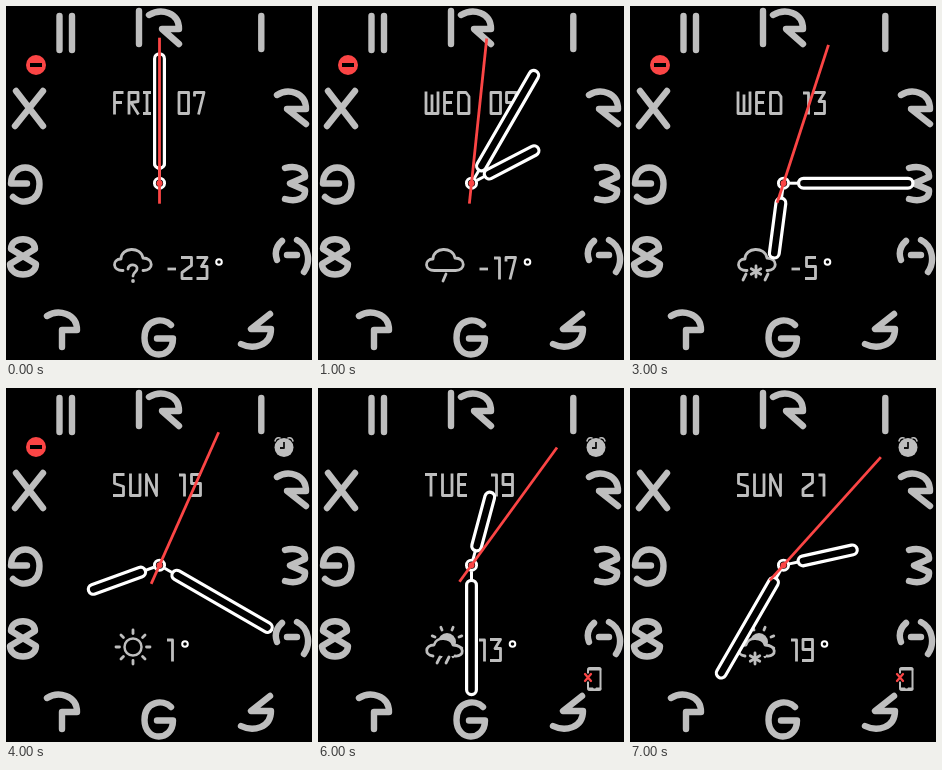
These frames come from a looping animation (306x354 px, 8 s). An HTML page with a canvas:

```html
<!DOCTYPE html>
<html lang="en">
<head>
<meta charset="utf-8">
<title>Watch face</title>
<style>
  html, body { margin: 0; width: 100%; height: 100%; overflow: hidden; background: #000; }
  canvas { display: block; width: 306px; height: 354px; }
</style>
</head>
<body>
<canvas id="face" width="306" height="354"></canvas>
<script>
const ctx = document.getElementById("face").getContext("2d");
const GRAY = "#bebebe", WHITE = "#fff", RED = "#fb4545";
const CENTER = { x: 153.5, y: 177.2 };
const STEPS = 8, STEP_MS = 1000;

// Hour marks, clockwise from 12
const NUMERALS = [
  "M133 5V38M143 9C155 2 173 6 173 23H156L173 38",
  "M255.3 10V43",
  "M271 89C282 82 300 86 300 103H281L300 118",
  "M279 162C290 159 300 163 299 171L284 177.5L299 184C300 193 290 196 279 193",
  "M276 235Q267 243 271 254M281 249H291M291 234C303 240 305 256 298 266",
  "M264 308L245 323H265C265 340 247 344 235 338",
  "M151 332.5H167C167 354 138.5 354 138.5 332C138.5 313 157 311 165 319",
  "M41 310C52 303 71 307 71 324H56V341",
  "M5 243C5 230 29 230 29 243L4 258C4 272 30 272 30 258Z",
  "M21 177.5H5C5 156 33.5 156 33.5 178C33.5 197 15 199 7 191",
  "M10 85L37 120M37 85L9 120",
  "M53.5 10V44M66 10V44"
].join("");

// Glyphs: width and strokes on a 23 px high cell
const GLYPHS = {
  0: [11.5, "M1 1H10.5V22H1Z"],
  1: [8, "M1 1.5H6.5V23"],
  2: [11.5, "M0 1H10.5V9L1 16V22H11.5"],
  3: [11.5, "M0 1H10.5L5 10H10.5V22H0"],
  5: [11.5, "M11 1H1.5V10H10.5V22H0"],
  7: [11.5, "M1 5V1H10.5L5 23"],
  9: [11.5, "M10.5 11H1V1H10.5V22H0"],
  "-": [11, "M1.5 12.5H10"],
  F: [11, "M10.5 1H1.5V23M1 11H9"],
  R: [11, "M1 23V1H10V10L3 11L10.5 23"],
  I: [7, "M0 1H8M4 1V22M0 22H8"],
  W: [14, "M1 0V22H13V0M7 3V22"],
  E: [10, "M10 1H1.5V22H10M1 11H9"],
  D: [13, "M1.5 1H9L12 5V22H1.5Z"],
  S: [12, "M11.5 1H1.5V10L10.5 13V22H0"],
  U: [12, "M1.5 0V22H11V0"],
  N: [13, "M1.5 23V1L11.5 22V0"],
  T: [12, "M0 1H12M6 1V23"]
};

const DAYS = ["SUN", "MON", "TUE", "WED", "THU", "FRI", "SAT"];
const CLOUD = "M117 264.5C106 265 106 253 115 253C115 241 135 240 137 252C148 252 148 265 137 264.5";
const LOW_CLOUD = "M116 272C107 272 107 261 116 260C117 249 134 249 136 260C147 260 147 272 137 272Z";

function stroke(path, color, width, cap = "round") {
  ctx.strokeStyle = color;
  ctx.lineWidth = width;
  ctx.lineCap = cap;
  ctx.lineJoin = "round";
  ctx.stroke(new Path2D(path));
}

function fill(path, color) {
  ctx.fillStyle = color;
  ctx.fill(new Path2D(path));
}

function disc(x, y, r, color) {
  ctx.beginPath();
  ctx.arc(x, y, r, 0, 7);
  ctx.fillStyle = color;
  ctx.fill();
}

function ring(x, y, r, color, width) {
  ctx.beginPath();
  ctx.arc(x, y, r, 0, 7);
  ctx.strokeStyle = color;
  ctx.lineWidth = width;
  ctx.stroke();
}

function placed(x, y, angle, draw) {
  ctx.save();
  ctx.translate(x, y);
  ctx.rotate(angle * Math.PI / 180);
  draw();
  ctx.restore();
}

// Returns the x after the last glyph
function write(text, x, y) {
  for (const ch of text) {
    const [width, path] = GLYPHS[ch];
    placed(x, y, 0, () => stroke(path, GRAY, 2.8, "butt"));
    x += width + 4;
  }
  return x;
}

const line = path => stroke(path, GRAY, 2.8);

function rays(x, y, count, inner, outer, start = 0) {
  for (let i = 0; i < count; i++) {
    placed(x, y, start + i * 360 / count, () => line(`M0 ${-inner}V${-outer}`));
  }
}

const flake = (x, y) => rays(x, y, 6, 0, 5.5);

function sunBehindCloud() {
  disc(129, 254, 9, GRAY);
  rays(129, 254, 8, 13, 16, 22.5);
  const cloud = "M115 268C106 267 107 257 116 257C118 248 133 249 135 257C147 257 147 269 137 268";
  fill(cloud, "#000");
  line(cloud);
}

const WEATHER = [
  () => { line(CLOUD); line("M122 263C122 257 132 258 131 263C131 266 127 266 127 270"); disc(127, 275, 1.9, GRAY); },
  () => { line(CLOUD + "Z"); line("M128 268L125 275"); },
  () => { line(CLOUD + "Z"); line("M121 268L117 275M133 268L129 275"); },
  () => { line(CLOUD); flake(126, 265.5); line("M116 268L113 274M138 268L135 274"); },
  () => { ring(127, 259, 8.5, GRAY, 2.5); rays(127, 259, 8, 13.5, 17); },
  () => {
    fill("M120 254C121 243 135 241 138 250C148 250 147 262 140 262Z", GRAY);
    fill(LOW_CLOUD, "#000");
    line(LOW_CLOUD);
  },
  () => { sunBehindCloud(); line("M122 269L119 275M131 269L128 275"); },
  () => { sunBehindCloud(); flake(125, 270.5); }
];

function doNotDisturb() {
  disc(30, 59, 10, RED);
  stroke("M24 59H36", "#000", 4, "butt");
}

function alarm() {
  stroke("M269 53Q270 49 274 50M287 53Q286 49 282 50", GRAY, 1.5);
  disc(278, 59.5, 9.5, GRAY);
  stroke("M278 54V60H274", "#111", 1.8, "butt");
}

function phoneOff() {
  stroke("M272 280H281Q282.5 280 282.5 282V300Q282.5 302 281 302H272Q270 302 270 300V282Q270 280 272 280Z", GRAY, 2);
  stroke("M271 281H282M271 301H282", GRAY, 3);
  disc(276.5, 299, 1.5, "#000");
  stroke("M267 286L273 293M273 286L267 293", "#000", 4.5);
  stroke("M267 286L273 293M273 286L267 293", RED, 2.3);
}

function hand(angle, length) {
  placed(CENTER.x, CENTER.y, angle, () => {
    stroke("M0 -6V-15", WHITE, 3, "butt");
    const y = -length + 6.5;
    const capsule = `M-4.9 -20V${y}A4.9 4.9 0 0 1 4.9 ${y}V-20A4.9 4.9 0 0 1 -4.9 -20Z`;
    fill(capsule, "#000");
    stroke(capsule, WHITE, 3.2);
  });
}

function drawFace(step) {
  ctx.fillStyle = "#000";
  ctx.fillRect(0, 0, 306, 354);
  stroke(NUMERALS, GRAY, 6.4);

  const date = new Date(2022, step, 7 + 2 * step);
  write(DAYS[date.getDay()], 107, 85.5);
  write(String(date.getDate()).padStart(2, "0"), 172, 85.5);

  WEATHER[step]();
  const end = write(String(6 * step - 23), 160, 250.5);
  ring(end + 7, 256, 2.8, WHITE, 2);

  if (step < 5) doNotDisturb();
  if (step >= 4) alarm();
  if (step >= 5) phoneOff();

  const hour = 2 * step, minute = 5 * step;
  hand(hour * 30 + minute / 2, 77);
  hand(minute * 6, 131);
  disc(CENTER.x, CENTER.y, 6.5, WHITE);
  disc(CENTER.x, CENTER.y, 3.6, "#000");
  placed(CENTER.x, CENTER.y, step * 6, () => stroke("M0 20.5V-145.5", RED, 2.8, "butt"));
  disc(CENTER.x, CENTER.y, 3, RED);
}

const start = performance.now();
function tick(now) {
  const step = Math.floor(Math.max(0, now - start) / STEP_MS) % STEPS;
  drawFace(step);
  requestAnimationFrame(tick);
}
drawFace(0);
requestAnimationFrame(tick);
</script>
</body>
</html>
```
